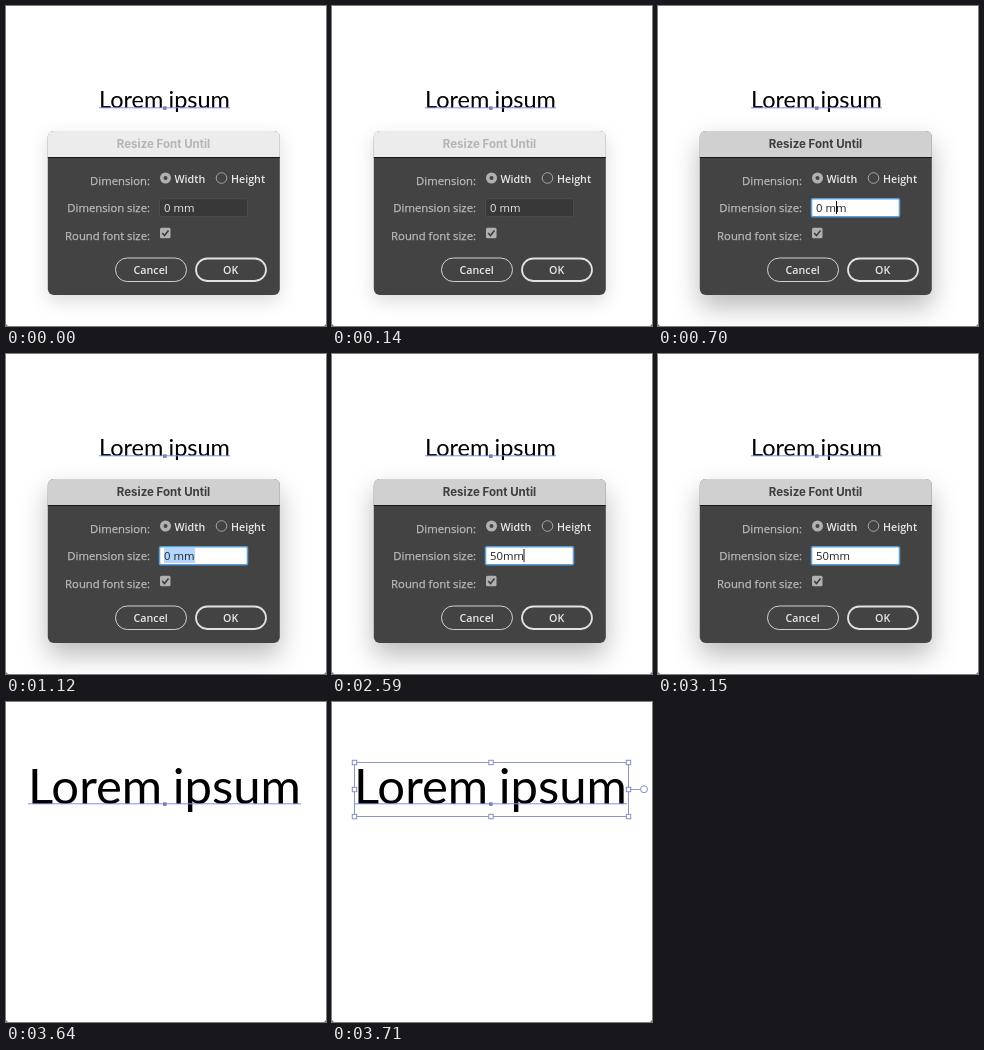
Animation, 320 px wide and 320 px high, one loop 4970 ms. Source, as an HTML page:

```html
<!DOCTYPE html>
<html lang="en">
<head>
<meta charset="utf-8">
<title>Resize Font Until</title>
<style>
  html, body { margin: 0; width: 100%; height: 100%; overflow: hidden; background: #fff; }
  svg { display: block; width: 100vw; height: 100vh; }
  text { white-space: pre; }
  .sample { font: 49px Lato, sans-serif; }
  .guide { stroke: #7a90ec; fill: none; }
  .handle { stroke: #8090c4; fill: #fff; }
  .frame { stroke: #8c97bd; fill: none; }
  .dialog { font: 11.3px "Open Sans", "Noto Sans", sans-serif; fill: #e8e8e8; }
  .label { fill: #bababa; stroke: #bababa; stroke-width: .25; text-anchor: end; }
  .strong { font-size: 10.7px; font-weight: 600; }
  .mid { text-anchor: middle; }
  .title { font: 700 11.5px Inter, sans-serif; fill: #b5b5b5; text-anchor: middle; }
  .bar { fill: #ececec; }
  .shadow { fill: #434343; filter: drop-shadow(0 6px 9px rgba(0,0,0,.14)); }
  .field { fill: #383838; stroke: #4d4d4d; }
  .active .title { fill: #3d3d3d; }
  .active .bar { fill: #d1d0d1; }
  .active .shadow { filter: drop-shadow(0 12px 13px rgba(0,0,0,.27)); }
  .active .field { fill: #fff; stroke: #5c9fd8; stroke-width: 1.5; }
  .active #value { fill: #222; }
</style>
</head>
<body>
<svg viewBox="0 0 320 320">
  <path d="M0 318v2h2zM320 318v2h-2z" fill="#777"/>
  <g id="sample">
    <text class="sample" y="101.8"><tspan x="22">Lorem</tspan> <tspan x="166.8">ipsum</tspan></text>
    <path class="guide" d="M22 101.8H295" vector-effect="non-scaling-stroke"/>
  </g>
  <rect x="157" y="100.3" width="3.6" height="3.6" fill="#7384b4"/>

  <g id="bounds">
    <path class="frame" d="M22.5 60.5H296.5V114.5H22.5ZM296.5 87.5H309"/>
    <circle class="handle" cx="312" cy="87.2" r="3.5"/>
  </g>

  <g id="dialog" class="dialog">
    <rect class="shadow" x="41.8" y="125" width="232" height="164" rx="6"/>
    <path class="bar" d="M41.8 151V131q0-6 6-6H267.8q6 0 6 6V151Z"/>
    <path d="M41.8 151.5H273.8" stroke="#15161c"/>
    <text class="title" x="157.5" y="142.2">Resize Font Until</text>

    <text class="label" x="144" y="178.5">Dimension:</text>
    <text class="label" x="144" y="206">Dimension size:</text>
    <text class="label" x="144" y="233.5">Round font size:</text>

    <circle cx="159.5" cy="172" r="5.5" fill="#b0b0b0"/>
    <circle cx="159.5" cy="172" r="2" fill="#444"/>
    <circle cx="215.5" cy="172" r="5.3" fill="none" stroke="#a4a4a4"/>
    <text class="strong" x="168.5" y="177">Width</text>
    <text class="strong" x="225" y="177">Height</text>

    <rect class="field" x="153.5" y="192.7" width="88" height="18" rx="1.5"/>
    <rect id="selection" x="158" y="194" width="31" height="15" fill="#b3d7ff"/>
    <text id="value" x="158" y="206"></text>
    <path id="caret" d="M0 195V208" stroke="#111"/>

    <rect x="154" y="221.7" width="10.5" height="10.5" rx="1.5" fill="#b0b0b0"/>
    <path d="M156.2 227l2.3 2.5 4-5" fill="none" stroke="#3a3a3a" stroke-width="1.5"/>

    <rect x="109.5" y="252" width="71" height="23.5" rx="11.75" fill="none" stroke="#d0d0d0"/>
    <rect x="190" y="252.5" width="70" height="22.5" rx="11.25" fill="none" stroke="#e2e2e2" stroke-width="1.8"/>
    <text class="strong mid" x="144.7" y="268">Cancel</text>
    <text class="strong mid" x="224.7" y="268">OK</text>
  </g>
</svg>
<script>
const LOOP = 4970, RESIZED = 3640, SELECTED = 3710;
const $ = id => document.getElementById(id);
const show = (id, on) => $(id).style.display = on ? "" : "none";

// Field states: start time, text, caret x (0 hides it), all selected
const steps = [
  [0, "0 mm", 0],
  [700, "0 mm", 178.5],
  [1120, "0 mm", 0, true],
  [1540, "5", 165.5],
  [1820, "50", 172.5],
  [2310, "50m", 182.5],
  [2590, "50mm", 192],
  [3150, "50mm", 0]
];

for (const y of [60.5, 87.5, 114.5])
  for (const x of [22.5, 159, 296.5])
    if (x !== 159 || y !== 87.5)
      $("bounds").insertAdjacentHTML("beforeend",
        `<rect class="handle" x="${x - 2.2}" y="${y - 2.2}" width="4.4" height="4.4"/>`);

function draw(now) {
  const t = now % LOOP;
  const [start, text, caret, selected] = steps.findLast(s => s[0] <= t);
  const scale = t < RESIZED ? .48 : 1;
  $("sample").setAttribute("transform",
    `translate(158.5 101.8) scale(${scale}) translate(-158.5 -101.8)`);
  show("bounds", t >= SELECTED);
  show("dialog", t < RESIZED);
  $("dialog").classList.toggle("active", start > 0);
  $("value").textContent = text;
  show("selection", selected);
  show("caret", caret);
  $("caret").setAttribute("transform", `translate(${caret} 0)`);
}

const origin = performance.now();
function tick() {
  draw(performance.now() - origin);
  requestAnimationFrame(tick);
}
tick();
</script>
</body>
</html>
```
